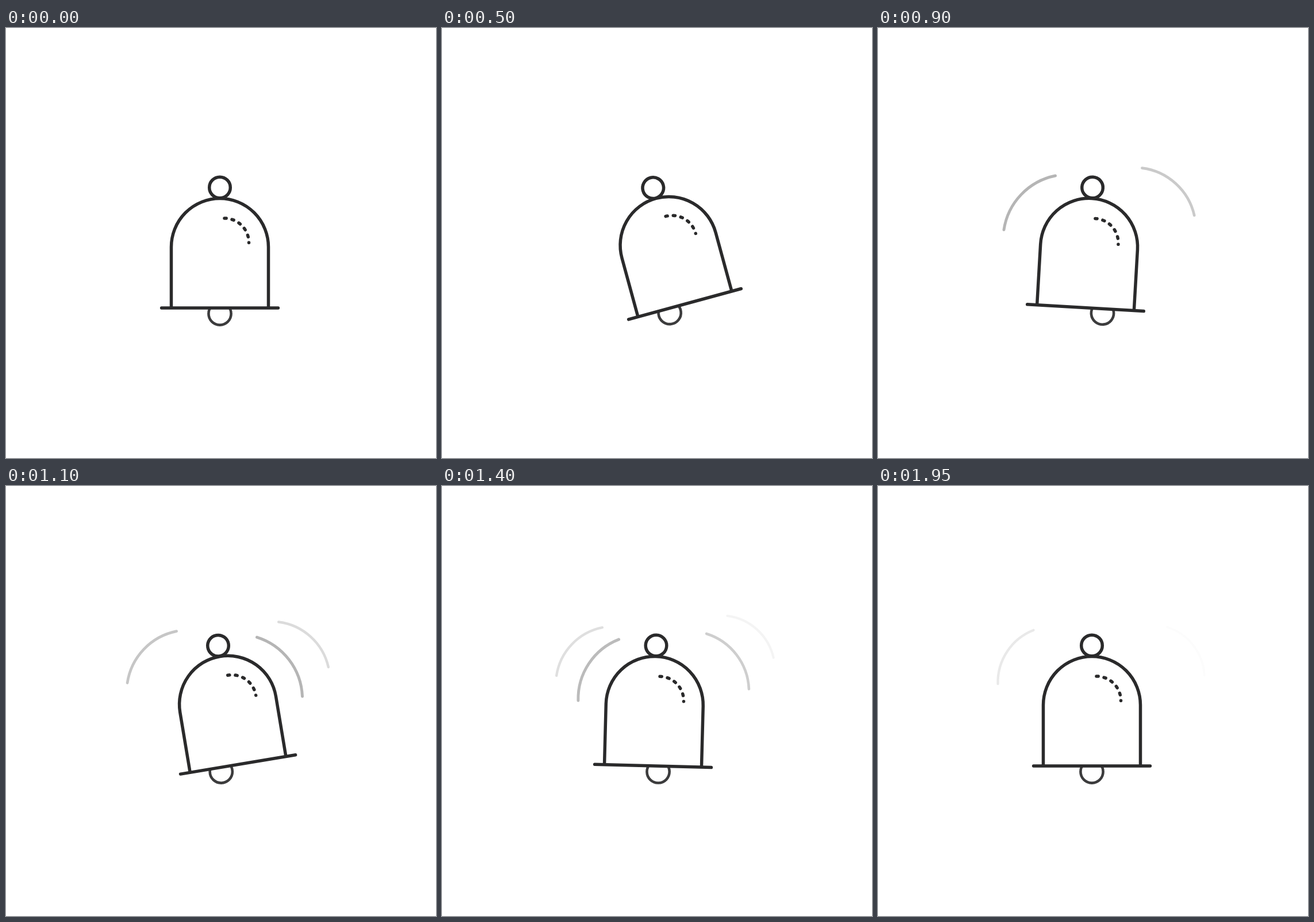
These frames come from a looping animation (748 px wide and 748 px high, 2700 ms). An HTML page with a canvas:

```html
<!DOCTYPE html>
<html lang="en">
<head>
<meta charset="utf-8">
<title>Ringing bell</title>
<style>
html, body { margin: 0; width: 100%; height: 100%; overflow: hidden; background: #fff; }
canvas { display: block; width: 748px; height: 748px; }
</style>
</head>
<body>
<canvas id="stage" width="748" height="748"></canvas>
<script>
const ctx = document.getElementById('stage').getContext('2d');
const LOOP = 2700, STEP = 50, LAST = 1950;
const RAD = Math.PI / 180;
const PIVOT = { x: 372, y: 295.5 };
const INK = '#2a2a2b';

// Swing keys: time, bell angle, clapper angle relative to the bell
const KEYS = [
  [0, 0, 0],
  [300, 42, -12.6],
  [588, -30.8, 14.1],
  [840, 7.2, -13.8],
  [1045, -12.6, 12.75],
  [1250, 6, -10.6],
  [1475, 0, 0]
];

// Sound waves: reference time, chord middle, drift per ms, chord angle
const WAVES = [
  { t: 650, x: 489, y: 296, vx: 0.0633, vy: -0.045, angle: 42.2 },
  { t: 900, x: 263.75, y: 304, vx: -0.0495, vy: -0.032, angle: -46.4 },
  { t: 1100, x: 476, y: 314.5, vx: 0.07, vy: -0.0317, angle: 52.5 },
  { t: 1330, x: 276.4, y: 322.9, vx: -0.0595, vy: -0.041, angle: -56.4 }
];
const LEAD = 117, HALF_ARC = 35 * RAD;

function swing(t) {
  const i = KEYS.findIndex(k => k[0] > t);
  if (i < 0) return [0, 0];
  const a = KEYS[i - 1], b = KEYS[i];
  const p = (1 - Math.cos(Math.PI * (t - a[0]) / (b[0] - a[0]))) / 2;
  return [1, 2].map(n => (a[n] + (b[n] - a[n]) * p) * RAD);
}

function turn(angle) {
  ctx.translate(PIVOT.x, PIVOT.y);
  ctx.rotate(angle);
  ctx.translate(-PIVOT.x, -PIVOT.y);
}

function ring(x, y, r) {
  ctx.beginPath();
  ctx.arc(x, y, r, 0, Math.PI * 2);
  ctx.stroke();
}

function drawWave(w, t) {
  const age = t - w.t;
  const shade = 74 - 0.084 * age;
  if (age < -LEAD || shade <= 0) return;
  const chord = 129.7 - 0.0283 * age;
  const r = chord / 2 / Math.sin(HALF_ARC);
  ctx.save();
  ctx.translate(w.x + w.vx * age, w.y + w.vy * age);
  ctx.rotate(w.angle * RAD);
  ctx.lineWidth = 5 * chord / 130;
  ctx.strokeStyle = `rgba(0,0,0,${shade / 255})`;
  ctx.beginPath();
  ctx.arc(0, r * Math.cos(HALF_ARC), r, -Math.PI / 2 - HALF_ARC, -Math.PI / 2 + HALF_ARC);
  ctx.stroke();
  ctx.restore();
}

function drawClapper(angle) {
  ctx.save();
  ctx.beginPath();
  ctx.rect(250, 487, 244, 60);
  ctx.clip();
  turn(angle);
  ctx.strokeStyle = '#3c3c3d';
  ctx.lineWidth = 4.6;
  ring(372, 497, 19.6);
  ctx.restore();
}

function drawBell(angle, clapper) {
  ctx.save();
  turn(angle);
  drawClapper(clapper);
  ctx.strokeStyle = INK;
  ctx.lineWidth = 5.5;
  ring(372, 277.5, 18.3);

  ctx.beginPath();
  ctx.moveTo(287.5, 486);
  ctx.lineTo(287.5, 381);
  ctx.arc(372, 381, 84.5, Math.PI, 0);
  ctx.lineTo(456.5, 486);
  ctx.stroke();

  ctx.beginPath();
  ctx.moveTo(270.6, 487);
  ctx.lineTo(473.4, 487);
  ctx.stroke();

  ctx.setLineDash([3.2, 10.1]);
  ctx.beginPath();
  ctx.arc(380, 373.5, 42.5, -Math.PI / 2, 0);
  ctx.stroke();
  ctx.restore();
}

function draw(t) {
  ctx.fillStyle = '#fff';
  ctx.fillRect(0, 0, 748, 748);
  ctx.lineCap = 'round';
  WAVES.forEach(w => drawWave(w, t));
  drawBell(...swing(t));
}

let start;
function tick(now) {
  if (start === undefined) start = now;
  const t = (now - start) % LOOP;
  draw(Math.min(LAST, Math.floor(t / STEP) * STEP));
  requestAnimationFrame(tick);
}
draw(0);
requestAnimationFrame(tick);
</script>
</body>
</html>
```
